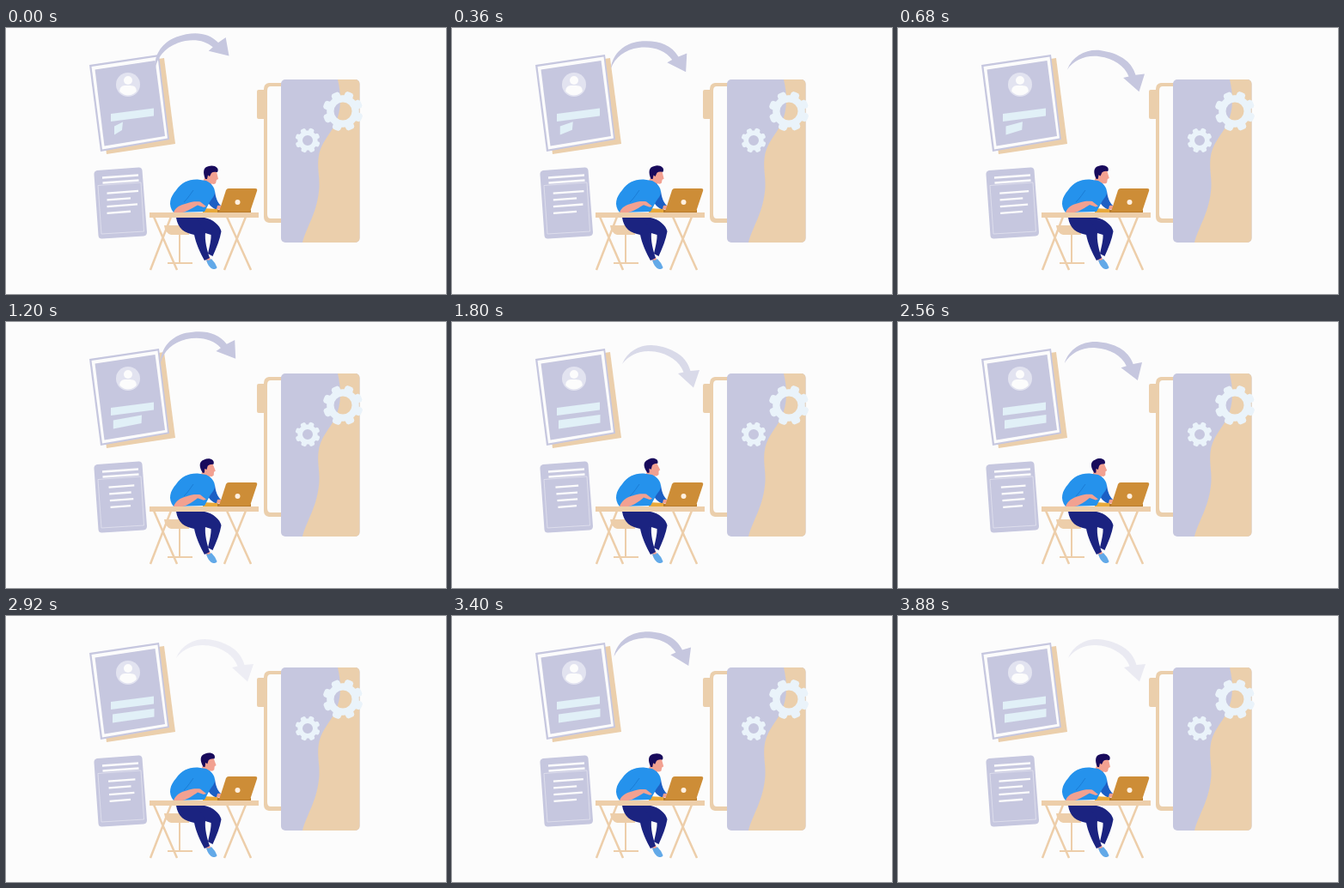
Write an HTML page with a canvas that moves like this. It is 512 by 310 pixels and loops after 3.92 s.

```html
<!DOCTYPE html>
<html>
<head>
<meta charset="utf-8">
<style>
  html, body { margin: 0; width: 100%; height: 100%; overflow: hidden; background: #fcfcfc; }
  canvas { display: block; }
</style>
</head>
<body>
<canvas id="stage" width="512" height="310"></canvas>
<script>
const ctx = document.getElementById('stage').getContext('2d');
const LOOP = 3920, ARROW_CYCLE = 980;
const LAVENDER = '#c6c7df', BEIGE = '#ebcfac', DESK = '#edceaa', WHITE = '#fcfcfc',
      ICE = '#e1f0f7', GEAR = '#eaf3fa', SHIRT = '#2592ec', SLEEVE = '#1c5fc4',
      NAVY = '#1b2380', HAIR = '#180a5c', SKIN = '#f2a191';

const clamp = v => Math.max(0, Math.min(1, v));
const mix = (a, b, p) => a + (b - a) * p;

function shape(color, d) {
  ctx.fillStyle = color;
  ctx.fill(new Path2D(d), 'evenodd');
}

function line(color, width, d) {
  ctx.strokeStyle = color;
  ctx.lineWidth = width;
  ctx.lineJoin = 'round';
  ctx.stroke(new Path2D(d));
}

function disc(color, x, y, r) {
  ctx.fillStyle = color;
  ctx.beginPath();
  ctx.arc(x, y, r, 0, Math.PI * 2);
  ctx.fill();
}

// Draws with the stage turned about (x, y), then shifted.
function turned(x, y, angle, draw, dx = 0, dy = 0) {
  ctx.save();
  ctx.translate(x + dx, y + dy);
  ctx.rotate(angle);
  ctx.translate(-x, -y);
  draw();
  ctx.restore();
}

// Piecewise-linear value through [time, value] stops.
function track(stops, t) {
  for (let i = 1; i < stops.length; i++) {
    const [t0, a] = stops[i - 1], [t1, b] = stops[i];
    if (t < t1) return mix(a, b, (t - t0) / (t1 - t0));
  }
  return stops[stops.length - 1][1];
}

function gear(x, y, r, hole) {
  const teeth = 8, step = Math.PI * 2 / teeth, root = r * 0.8;
  ctx.fillStyle = GEAR;
  ctx.beginPath();
  for (let i = 0; i < teeth; i++) {
    const a = (i + 0.46) * step;
    ctx.arc(x, y, root, a - step * 0.5, a - step * 0.36);
    ctx.arc(x, y, r * 0.95, a - step * 0.28, a - step * 0.26);
    ctx.arc(x, y, r, a - step * 0.18, a + step * 0.18);
    ctx.arc(x, y, r * 0.95, a + step * 0.26, a + step * 0.28);
    ctx.arc(x, y, root, a + step * 0.36, a + step * 0.5);
  }
  ctx.closePath();
  ctx.moveTo(x + hole, y);
  ctx.arc(x, y, hole, 0, Math.PI * 2);
  ctx.fill('evenodd');
}

function folder() {
  shape(BEIGE, 'M294 72H303V106H294Q292 106 292 104V74Q292 72 294 72Z');
  shape(BEIGE, 'M306 64H330V227H306Q300 226 300 220V71Q300 65 306 64Z');
  shape(WHITE, 'M308 68H330V222H308Q304 222 304 217V73Q304 68 308 68Z');
  ctx.save();
  ctx.beginPath();
  ctx.roundRect(320, 60, 91.5, 190, 5);
  ctx.clip();
  ctx.fillStyle = LAVENDER;
  ctx.fillRect(320, 60, 92, 190);
  shape(BEIGE, 'M386 60C390 77 391 95 383 112C377 124 365 135 363.5 152C362 166 366 177 364 191C361 217 350 231 345 250H412V60Z');
  ctx.restore();
  gear(392, 97, 23.5, 10.5);
  gear(351, 131, 14.5, 6);
}

function profileSheet(t) {
  shape(BEIGE, 'M104 47L184 35L197 135L117 147Z');
  shape(LAVENDER, 'M97 43L178 31L190 130L110 144Z');
  shape(WHITE, 'M99.5 45L176.5 33.5L188 128.5L112 141.5Z');
  shape(LAVENDER, 'M103.5 48.5L173.5 38L185 126L114.5 137.5Z');
  disc('#e2e3f0', 142, 66, 14);
  ctx.save();
  ctx.beginPath();
  ctx.arc(142, 66, 12.5, 0, Math.PI * 2);
  ctx.clip();
  disc(WHITE, 142, 61, 5);
  shape(WHITE, 'M132 76C132 66 137 67 142 67C148 67 152 67 152 75Q142 82 132 76Z');
  ctx.restore();

  shape(ICE, 'M122 100L172 93.5V102.5L122 109Z');
  const right = track([[0, 136], [680, 145], [1200, 158], [1800, 172.5]], t);
  const p = clamp((right - 136) / 36.5), left = mix(126, 124, p);
  shape(ICE, `M${left} 114.5L${right} ${mix(109.5, 108, p)}L${right - 1 + p} ${mix(119, 117.5, p)}L${left} 124.5Z`);
}

function textSheet(lean) {
  shape(LAVENDER, 'M106 166L154 162.5Q158 162 158.5 166L164 238Q164 242 160 242.5L112 245.5Q108 246 107.5 242L102.5 171Q102 167 106 166Z');
  line('#e3e3ef', 0.8, 'M107 183.5L157 180L160.5 237L111 240Z');
  line(WHITE, 2.3, 'M112 174.5L154 171.5M112.5 180.5L154.5 177.5');
  [[154, 147], [145, 146], [153, 146], [145, 145]].forEach(([wide, narrow], i) => {
    const x0 = mix(117.5, 120.5 + i, lean), x1 = mix(wide, narrow, lean), y = 192.7 + i * 7.7;
    line(WHITE, 2.3, `M${x0} ${y}L${x1} ${y - (x1 - x0) * 0.075}`);
  });
}

function worker(lean) {
  // chair
  shape(DESK, 'M184 230H210Q214 231 213 241H192Q185 239 184 230Z');
  line(DESK, 2, 'M202 240V274M188 274H217');

  // legs
  shape(SKIN, 'M232 268L237 267L239 272L234 273Z');
  shape('#62a9e8', 'M233 270Q236 272 239 269Q244 274 245.5 279Q245 281 241 281Q235 279 233 270Z');
  shape(NAVY, 'M212 221H231C241 223 249 230 250.5 237C249 246 245 256 240.5 266L235 263C237 254 239 246 238.5 241L222 236Z');
  shape(NAVY, 'M198 221H222C224 227 230 232 232 238C231 248 234 259 237 268L231 271C226 262 221 251 219 241C208 239 200 234 198 221Z');

  // head
  turned(235, 182, -0.25 * lean, () => {
    shape(SKIN, 'M235 168L245 167Q246 172 247 176L245 177L244 181Q241 183 239.5 181L238 187L228 181L232 173Z');
    shape(HAIR, 'M232 176C229 169 229 162 236 161C242 159 249 163 246 168Q241 167 239 169L237 173L235 171.5L234 176Z');
  }, -3 * lean, -lean);

  // torso and arms
  shape(SLEEVE, 'M238 194L243 190C244 198 246 203 250 207L246 212C240 210 236 206 234 201Z');
  shape('#e8a93b', 'M229 210L246 211L248 215H229Z');
  shape(SHIRT, 'M195 215C188 206 191 197 198 189C204 180 213 176 223 176.5L233 178C239 181 243 186 243 191C243 196 239 199 237 203L231 214Z');
  line('#1976cf', 0.8, 'M207 203C212 198 215 193 218 189');
  shape(SKIN, 'M246 207Q250 206 253 209L250 212L245 211Z');
  const lift = 2 * lean;
  shape(SKIN, `M195 215C197 209 203 ${206 - lift} 210 ${204.5 - lift}C216 ${202 - lift} 222 ${202 - lift} 226 ${202.5 - lift}L233 ${208 - lift}L230 ${209 - lift}L223 ${206.5 - lift}C218 209 211 214 205 215Z`);
}

function desk() {
  line(DESK, 2.5, 'M192 220L168 282M172 220L199 282M279 220L254 282M257 220L285 282');
  shape('#b77a2b', 'M246 212H285V215H246Z');
  shape('#cd8d37', 'M259 187H290Q293 187 292 190L284 214H248L256 189Q257 187 259 187Z');
  disc('#fff0e0', 269.5, 203, 3);
  ctx.fillStyle = DESK;
  ctx.fillRect(167, 215, 127, 6);
}

function arrow(t) {
  const phase = t % ARROW_CYCLE;
  const swing = Math.pow(clamp(phase / 710), 1.15);
  const angle = -29 * (1 - swing) * Math.PI / 180;
  ctx.globalAlpha = 1 - 0.76 * clamp((phase - 680) / 300);
  turned(185, 96, angle, () => {
    shape(LAVENDER, 'M198 49C205 32 222 25 238 27.5C258 31 273 40 277.5 57L288 56L281 76.5L263 60L269.5 58.5C265 46 252 37 236 34.5C220 32 206 38 198 49Z');
  });
  ctx.globalAlpha = 1;
}

function render(now) {
  const t = now % LOOP;
  const lean = (1 - Math.cos(t / LOOP * Math.PI * 2)) / 2;
  ctx.fillStyle = WHITE;
  ctx.fillRect(0, 0, 512, 310);
  folder();
  profileSheet(t);
  textSheet(lean);
  worker(lean);
  desk();
  arrow(t);
}

let start;
function tick(now) {
  start ??= now;
  render(now - start);
  requestAnimationFrame(tick);
}
render(0);
requestAnimationFrame(tick);
</script>
</body>
</html>
```
